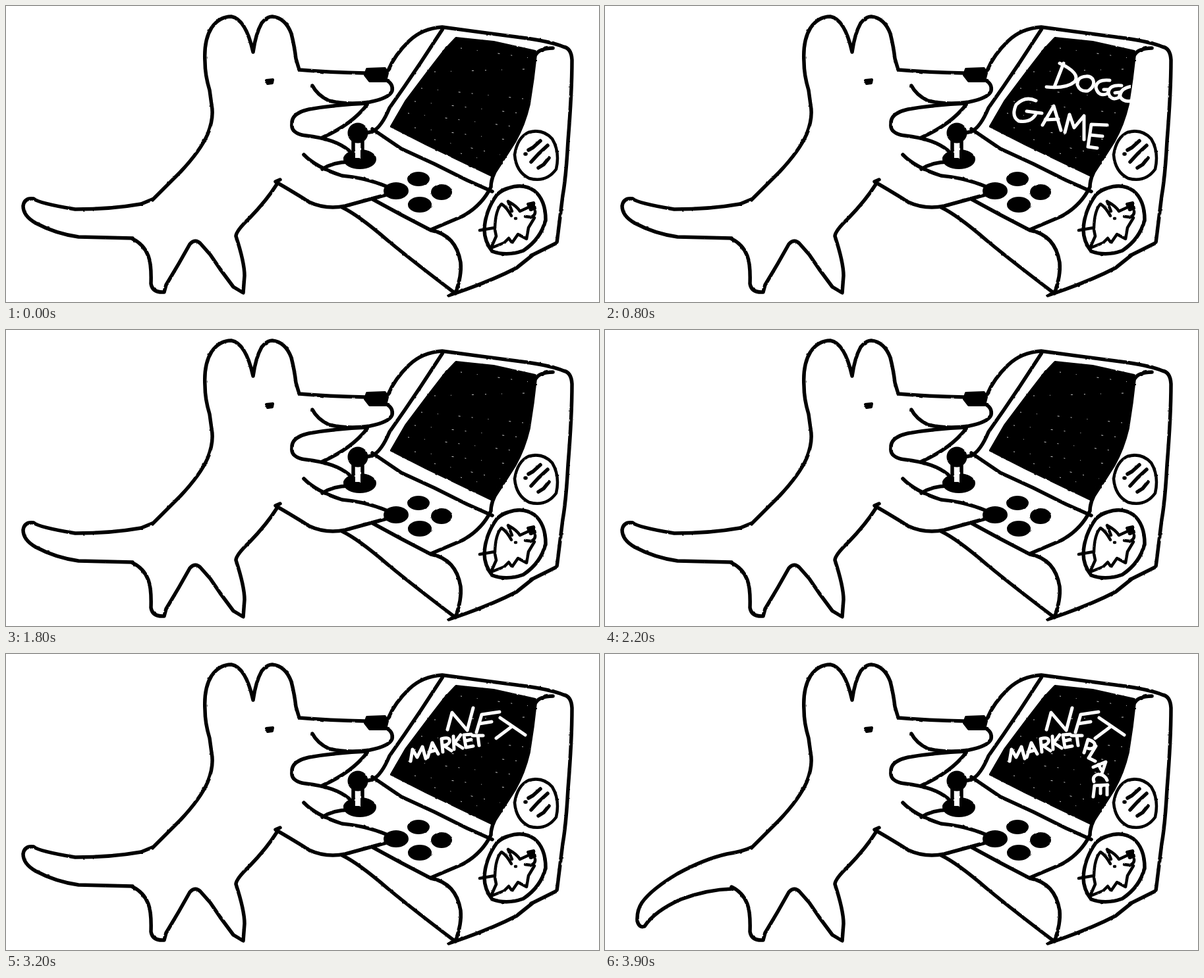
These frames come from a looping animation (900x450 px, 4 s). An HTML page without scripts:

```html
<!DOCTYPE html>
<html lang="en">
<head>
<meta charset="utf-8">
<title>Dog at the arcade</title>
<style>
  html, body { margin: 0; width: 100%; height: 100%; overflow: hidden; background: #fff; }
  svg { display: block; width: 900px; height: 450px; }
  .ink { fill: none; stroke: #000; stroke-width: 5.5; stroke-linecap: round; stroke-linejoin: round; }
  .solid { fill: #000; stroke-width: 4; }
  .thin { stroke-width: 4.5; }
  .speck { fill: none; stroke: #fff; stroke-width: 1; stroke-dasharray: 2 23 1 31 3 17; opacity: .8; }

  .tail { animation: wag .2s step-end infinite; }
  .low { animation-delay: -.1s; }
  @keyframes wag { 0% { opacity: 1 } 50%, 100% { opacity: 0 } }

  .words { fill: none; stroke: #fff; stroke-width: 5; stroke-linecap: round; stroke-linejoin: round; animation: 4s step-end infinite; }
  .words path { animation: type 4s step-end calc(var(--t) * .1s - 4.002s) infinite; }
  .game { animation-name: game; }
  .market { animation-name: market; }
  @keyframes type { 0% { opacity: 1 } 40%, 100% { opacity: 0 } }
  @keyframes game { 0% { opacity: 1 } 22.5% { opacity: 0 } 25% { opacity: 1 } 27.5%, 100% { opacity: 0 } }
  @keyframes market { 0% { opacity: 0 } 62% { opacity: 1 } 95% { opacity: 0 } 97.5%, 100% { opacity: 1 } }
</style>
</head>
<body>
<svg viewBox="0 0 900 450">
  <defs>
    <!-- slight hand-drawn wobble -->
    <filter id="wobble" filterUnits="userSpaceOnUse" x="0" y="0" width="900" height="450" color-interpolation-filters="sRGB">
      <feTurbulence type="fractalNoise" baseFrequency=".12" numOctaves="2" seed="4"/>
      <feDisplacementMap in="SourceGraphic" scale="2" xChannelSelector="R" yChannelSelector="G"/>
    </filter>
    <path id="screen" d="M683 49L740 55L803 69L799 110L793 150Q786 180 772 205L753 236L738 258L690 235L640 211L585 183L607 145L640 101L667 66Z"/>
    <clipPath id="glass"><path d="M580 40H798V265H580Z"/></clipPath>
  </defs>

  <g class="ink" filter="url(#wobble)">
    <!-- cabinet -->
    <path d="M580 98Q590 74 612 53Q632 34 662 32Q720 40 790 49Q830 55 846 62Q858 64 859 82Q859 130 853 205Q850 260 845 288L836 360L800 378L775 398Q735 419 672 440"/>
    <path d="M664 33L630 85L605 122L582 155Q570 184 556 191L546 193"/>
    <path d="M556 187L600 217L650 240L700 265L738 282"/>
    <path d="M830 64Q808 64 803 76L799 110L793 150Q786 180 772 205L742 252Q736 264 736 275Q722 304 692 320L645 340"/>
    <path d="M555 293Q600 318 645 341Q683 348 690 390Q692 410 682 437Q620 390 580 357Q535 318 510 306"/>
    <path d="M548 150Q525 180 480 200"/>
    <use href="#screen" class="solid"/>

    <!-- joystick and buttons -->
    <ellipse class="solid" cx="537" cy="233" rx="23" ry="13"/>
    <path d="M527 205V235M541 205V235"/>
    <path d="M530 207H538V231H530Z" fill="#fff" stroke="none"/>
    <circle class="solid" cx="534" cy="193" r="13.5"/>
    <ellipse class="solid" cx="592" cy="281" rx="17" ry="11"/>
    <ellipse class="solid" cx="626" cy="263" rx="15" ry="9"/>
    <ellipse class="solid" cx="661" cy="283" rx="14" ry="10"/>
    <ellipse class="solid" cx="628" cy="302" rx="16" ry="10"/>

    <!-- speaker -->
    <path d="M793 192Q815 186 829 202Q841 222 835 248Q820 269 794 262Q774 252 772 226Q776 200 793 192Z" stroke-width="4.5"/>
    <path d="M788 225h1M793 219L800 215L811 205M797 237L808 225L822 212M808 246L816 241L824 231"/>

    <!-- badge -->
    <path d="M762 277Q785 269 802 281Q819 295 819 325Q812 354 785 372Q760 381 738 373Q726 358 726 340Q727 312 745 287Q752 280 762 277Z"/>
    <g class="thin">
      <path d="M719 341L742 337Q743 310 752 301Q760 306 767 319M762 297L768 312M762 297Q775 304 780 312L793 306"/>
      <path d="M788 320L797 321Q804 318 803 312M742 340L744 350L736 368L756 360L763 353L768 360L777 347L790 354L793 337L802 322M773 323h1"/>
      <path class="solid" d="M792 301L801 299L803 308L796 310Z"/>
    </g>

    <!-- dog -->
    <path d="M222 295L265 252Q295 220 306 195Q316 170 312 150L309 128Q302 105 302 85Q300 52 312 33Q324 16 342 16Q364 20 375 70Q379 42 388 26Q396 16 404 16Q424 18 433 42Q438 62 440 80L445 97Q490 101 546 102"/>
    <path d="M578 113Q588 119 586 129Q582 140 552 146Q520 151 490 144Q472 135 465 121"/>
    <path d="M548 148Q500 150 460 157Q433 163 434 179Q432 194 455 197Q500 202 521 220"/>
    <path class="solid" d="M548 96L575 95L579 102L576 114L552 114L545 105Z"/>
    <path class="solid" d="M395 113L405 112L404 117L397 118Z" stroke-width="2"/>
    <path d="M452 226Q470 245 510 258Q545 261 577 274M480 248Q498 236 525 237"/>
    <path d="M416 264L409 267Q435 282 460 298Q486 310 515 304L577 287"/>
    <path d="M411 271Q396 295 370 322Q349 342 349 350Q362 390 362 410L360 436L345 427L325 400L310 378L295 361Q287 353 279 362L262 392L243 424L240 435Q222 436 220 422Q221 393 216 380Q209 362 192 354"/>

    <path class="tail" d="M192 353Q145 352 110 351Q75 346 45 330Q26 319 26 304Q28 291 42 293Q50 300 105 309Q160 309 205 301L222 294"/>
    <path class="tail low" d="M222 294Q210 300 185 304Q150 312 110 334Q70 358 56 378Q48 390 49 406Q52 417 60 414Q75 391 115 373Q155 358 193 357"/>
  </g>

  <path class="speck" d="M650 100L788 96M630 125L785 141M620 145L780 163M610 163L776 184M620 185L766 204M650 203L750 226M690 224L745 239M690 64L795 79"/>

  <g class="words game" role="img" aria-label="DOGGO GAME" clip-path="url(#glass)">
    <path style="--t:1" d="M696 87L682 123M690 87Q722 102 713 115Q700 126 670 123"/>
    <path style="--t:2" d="M730 107Q716 108 717 120Q721 131 733 129Q744 122 741 113Q738 106 730 107"/>
    <path style="--t:3" d="M766 113Q746 111 745 124Q749 139 763 133L765 127L757 127"/>
    <path style="--t:4" d="M784 121Q765 119 764 132Q768 145 780 139L782 131L774 132"/>
    <path style="--t:5" d="M800 122Q781 125 782 138Q787 147 800 144"/>
    <path style="--t:6" d="M654 144Q638 136 624 150Q616 168 628 175Q648 178 655 162L640 160M655 162L663 163"/>
    <path style="--t:7" d="M664 181L681 152L692 189M668 173L688 172"/>
    <path style="--t:7" d="M698 192L705 165L712 185L727 167L727 203"/>
    <path style="--t:8" d="M762 181L738 180L733 214L747 216M736 196L755 198"/>
  </g>

  <g class="words market" role="img" aria-label="NFT MARKETPLACE">
    <path style="--t:25" d="M670 115L677 89L700 116L709 82"/>
    <path style="--t:26" d="M714 119L722 92L749 88M718 106L737 103"/>
    <path style="--t:27" d="M750 97L788 123M768 110L744 128"/>
    <path style="--t:28" d="M614 163L617 145L624 157L632 141L637 159"/>
    <path style="--t:28" d="M640 157L647 135L656 152M642 149L653 146"/>
    <path style="--t:29" d="M663 149L661 129Q675 125 673 134Q670 139 664 139L676 147"/>
    <path style="--t:30" d="M680 145L679 125M690 123L681 135L693 143"/>
    <path style="--t:31" d="M706 122L695 123L698 142L709 140M698 132L706 130"/>
    <path style="--t:32" d="M708 124L724 124M716 124L718 139"/>
    <path style="--t:33" d="M727 150L733 130Q747 134 742 142Q736 146 730 142"/>
    <path style="--t:34" d="M745 140L734 158L744 163"/>
    <path style="--t:35" d="M741 172L760 164L754 182M749 168L753 176"/>
    <path style="--t:36" d="M762 192Q758 182 748 183Q739 186 742 194"/>
    <path style="--t:37" d="M763 199L743 200L741 217M762 199L762 214M752 200L752 212"/>
  </g>
</svg>
</body>
</html>
```
